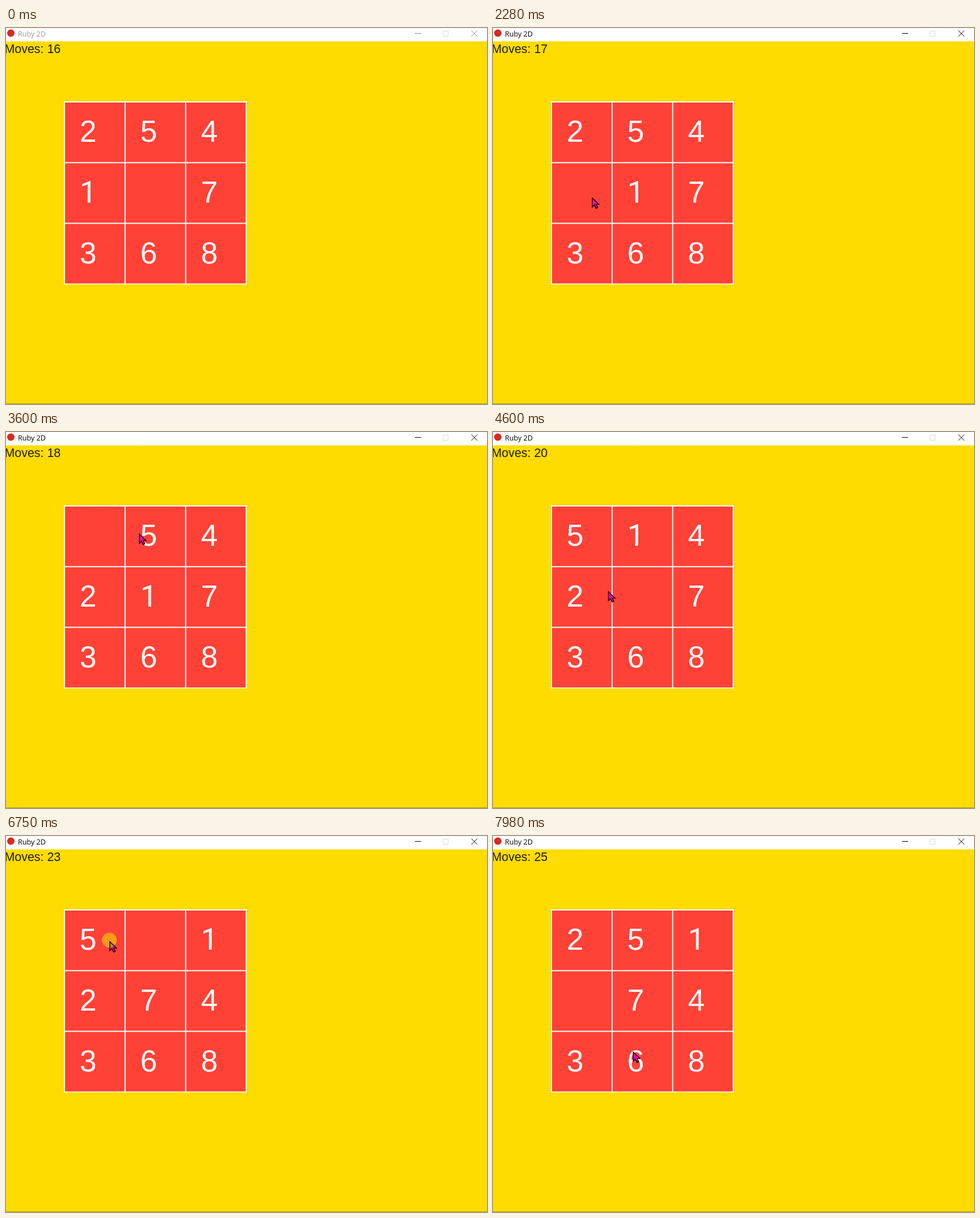
Animation, 847 px wide and 661 px high, one loop 8 s. Source, as an HTML page:

```html
<!DOCTYPE html>
<html lang="en">
<head>
<meta charset="utf-8">
<title>Sliding puzzle</title>
<style>
  html, body { margin: 0; width: 100%; height: 100%; overflow: hidden; background: #ffdc00; }
  svg { display: block; width: 100%; height: 100%; }
  .title { font: 12.6px "Open Sans", sans-serif; fill: #000; }
  .controls { fill: none; stroke: #000; }
  .inactive .title { fill: #999; }
  .inactive .controls { stroke: #888; }
  .moves, .digit { font-family: "Liberation Sans", Arial, sans-serif; }
  .moves { font-size: 21.4px; fill: #1f1b10; }
  .digit { font-size: 53.3px; fill: #fff; }
  .digit.one { font-family: Roboto, sans-serif; }
</style>
</head>
<body>
<svg viewBox="0 0 847 661" preserveAspectRatio="none">
  <defs>
    <radialGradient id="tinted" gradientUnits="userSpaceOnUse" cx="0" cy="-1" r="13">
      <stop offset="1" stop-color="#a5913c"/>
      <stop offset="1" stop-color="#f500b0"/>
    </radialGradient>
  </defs>
  <rect width="847" height="661" fill="#ffdc00"/>
  <rect y="660" width="847" height="1" fill="#a89420"/>
  <g id="bar">
    <rect width="847" height="23.5" fill="#fff"/>
    <circle cx="8.5" cy="9" r="6.5" fill="#dc281e"/>
    <text class="title" x="21" y="15">Ruby 2D</text>
    <path class="controls" d="M720 9.5h11M819.5 4.5l10.5 10.5m0-10.5l-10.5 10.5"/>
    <rect x="769.5" y="5.5" width="9" height="9" fill="none" stroke="#d8d8d8"/>
  </g>
  <text class="moves" id="moves" x="-2.5" y="43.7"></text>
  <rect x="102" y="129" width="322" height="321.6" fill="#fff"/>
  <g id="board"></g>
  <g id="pointer">
    <circle id="press" cy="-1" r="13" fill="#ff9a1a"/>
    <path id="arrow" d="M.9 1.8V17.6L4.6 14.2L7.6 20L10.3 18.7L7.8 13H12.6Z"
          stroke="#000" stroke-width="1.4"/>
  </g>
</svg>
<script>
const LOOP = 8000, FIRST_COUNT = 16, PITCH = 106.7, LEFT = 104, TOP = 131;
const PRESS_DELAY = 90, PRESS_LENGTH = 160;
const START = [2, 5, 4, 1, 0, 7, 3, 6, 8];

// The pointer rests at a click until the pressed tile has jumped into the gap.
const pass = (at, x, y) => ({ arrive: at, leave: at, x, y });
const click = (arrive, leave, x, y) => ({ arrive, leave, x, y, down: arrive + PRESS_DELAY });

const stops = [
  pass(20, 718, 608), pass(700, 75, 91), pass(880, 121, 112),
  click(1390, 1950, 179, 304), pass(2280, 174, 297),
  click(2480, 2900, 139, 191),
  click(3600, 3950, 234, 178),
  click(4140, 4420, 255, 279), pass(4740, 167, 279), pass(4920, 167, 279),
  click(5100, 5420, 367, 285),
  click(5540, 5840, 363, 210),
  click(5990, 6440, 245, 195),
  click(6650, 6970, 182, 184),
  click(7110, 7460, 168, 280), pass(7870, 204, 386),
  pass(7980, 246, 378)
];
const clicks = stops.filter(s => s.down);

const $ = id => document.getElementById(id);
const column = i => i % 3, row = i => Math.floor(i / 3);
const cellUnder = ({ x, y }) =>
  Math.floor((x - LEFT) / PITCH) + 3 * Math.floor((y - TOP) / PITCH);

$("board").innerHTML = START.map((_, i) => {
  const x = LEFT + column(i) * PITCH, y = TOP + row(i) * PITCH;
  return `<rect x="${x}" y="${y}" width="104.7" height="104.7" fill="#ff4136"/>
          <text x="${x + 25.8}" y="${y + 69.3}"></text>`;
}).join("");
const digits = document.querySelectorAll("#board text");

function showBoard(count) {
  const cells = [...START];
  for (const c of clicks.slice(0, count)) {
    const from = cellUnder(c), gap = cells.indexOf(0);
    [cells[from], cells[gap]] = [0, cells[from]];
  }
  cells.forEach((digit, i) => {
    digits[i].textContent = digit || "";
    digits[i].setAttribute("class", digit === 1 ? "digit one" : "digit");
  });
  $("moves").textContent = "Moves: " + (FIRST_COUNT + count);
}

function pointerAt(t) {
  const k = stops.findLastIndex(s => s.arrive <= t);
  const a = stops[Math.max(k, 0)], b = stops[k + 1] || a;
  const u = b === a ? 0 : Math.max(0, (t - a.leave) / (b.arrive - a.leave));
  const eased = u * u * (3 - 2 * u);
  return [a.x + (b.x - a.x) * eased, a.y + (b.y - a.y) * eased];
}

let shownCount;
function draw(t) {
  const count = clicks.filter(c => c.leave <= t).length;
  if (count !== shownCount) showBoard(shownCount = count);

  const pressed = clicks.some(c => t >= c.down && t < c.down + PRESS_LENGTH);
  $("bar").setAttribute("class", t < clicks[0].down ? "inactive" : "");
  $("press").style.display = pressed ? "" : "none";
  $("arrow").setAttribute("fill", pressed ? "url(#tinted)" : "#f500b0");
  $("pointer").style.display = t < stops[0].arrive ? "none" : "";
  $("pointer").setAttribute("transform", `translate(${pointerAt(t)})`);
}

const begin = performance.now();
function tick() {
  draw((performance.now() - begin) % LOOP);
  requestAnimationFrame(tick);
}
tick();
</script>
</body>
</html>
```
